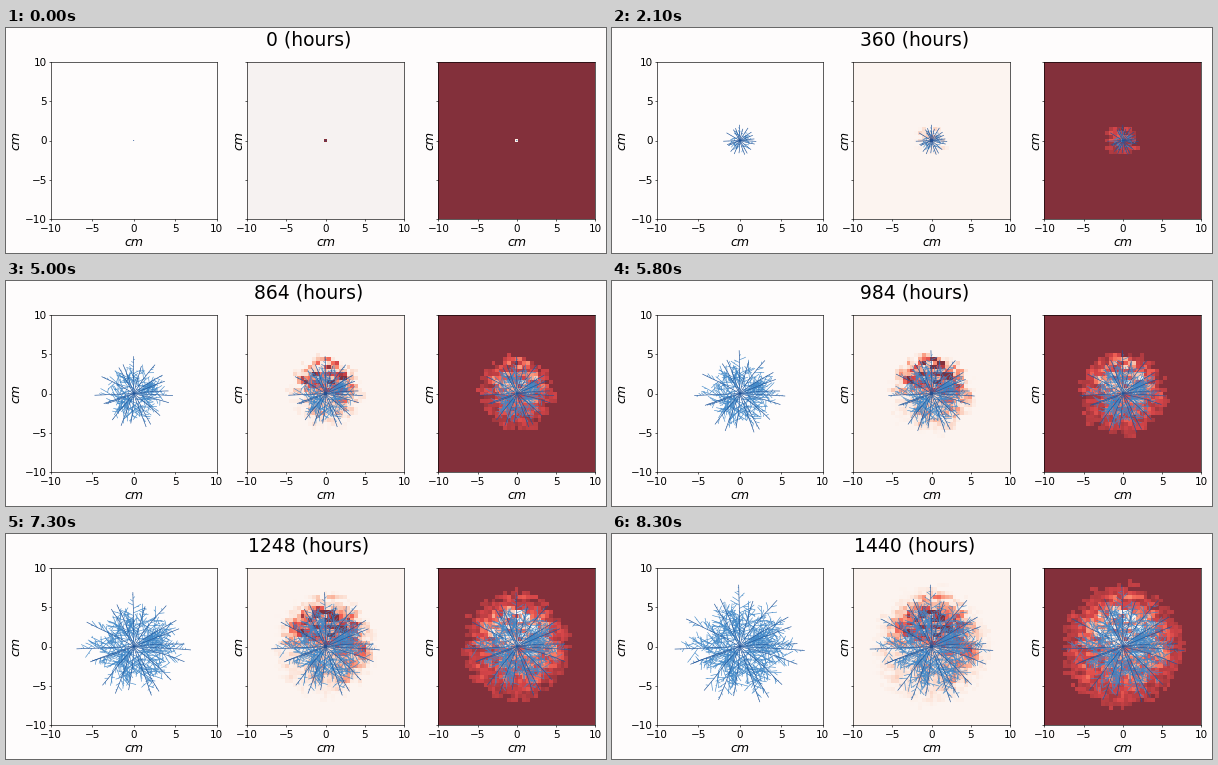
Animation of 600x225 px, one loop 8.4 s. Source, as a matplotlib script:

```python
import numpy as np
import matplotlib
import matplotlib.pyplot as plt
from matplotlib.animation import FuncAnimation
from matplotlib.collections import LineCollection

W, H, DPI = 600, 225, 100
FRAMES, STEP_MS, DAYS = 84, 100, 60
N = 41
BG = "#fefcfc"
DARK, LIGHT = "#1f5499", "#3f87c7"

plt.rcParams["font.family"] = "DejaVu Sans"
rng = np.random.default_rng(7)


class Root:
    """A gently bent line that lengthens at a fixed rate after its birth."""

    def __init__(self, start, angle, birth, rate, length, bend, seed=0.0, n=5):
        self.birth, self.rate, self.length = birth, rate, length
        self.seed, self.angle = seed, angle
        self.step = length / n
        heads = angle + np.cumsum(rng.normal(0, bend, n))
        moves = self.step * np.column_stack([np.cos(heads), np.sin(heads)])
        self.pts = np.vstack([start, start + np.cumsum(moves, axis=0)])

    def at(self, s):
        k = min(int(s / self.step), len(self.pts) - 2)
        f = s / self.step - k
        return k, self.pts[k] * (1 - f) + self.pts[k + 1] * f

    def grown(self, day):
        if day < self.birth:
            return None
        s = min(self.rate * (day - self.birth) + self.seed, self.length)
        k, tip = self.at(s)
        return np.vstack([self.pts[:k + 1], tip])


def branch(parent, s, delay, rate, length):
    _, p = parent.at(s)
    turn = rng.choice([-1, 1]) * np.radians(rng.uniform(22, 75))
    birth = parent.birth + s / parent.rate + delay
    return Root(p, parent.angle + turn, birth, rate, length, 0.06)


def build_roots():
    angles = [6, 21, 43, 58, 74, 91, 108, 123, 150, 183, 197, 211, 231, 249,
              268, 283, 302, 321, 343, 357]
    straight = (91, 183, 357)
    main = []
    for a in angles:
        v = 0.131 if a in straight else rng.uniform(0.1, 0.126)
        bend = 0.01 if a in straight else 0.05
        main.append(Root(np.zeros(2), np.radians(a), 0, v, 8.0, bend,
                         seed=0.01, n=8))
    side = [Root(np.array([-1.9, -0.05]), np.pi / 2, 19, 0.13, 2.6, 0.01)]
    for m in main:
        s = rng.uniform(0.4, 0.8)
        while s < m.rate * DAYS - 0.3:
            lat = branch(m, s, rng.uniform(1, 5), rng.uniform(0.06, 0.115),
                         rng.uniform(1.2, 4.0))
            side.append(lat)
            u = rng.uniform(0.3, 0.8)
            while u < lat.length:
                twig = branch(lat, u, rng.uniform(2, 5),
                              rng.uniform(0.04, 0.09), rng.uniform(0.5, 1.8))
                if twig.birth < DAYS:
                    side.append(twig)
                u += rng.uniform(0.5, 1.1)
            s += rng.uniform(0.3, 0.6)
    return main, side


main, side = build_roots()

# soil grid
c = (np.arange(N) + 0.5) * 20 / N - 10
X, Y = np.meshgrid(c, c)
dist = np.hypot(X, Y)
raw = rng.random((N, N))
noise = 0.65 * raw + 0.35 * np.roll(raw, 1, axis=1)
mid = N // 2


def blob(x, y, w, a):
    return a * np.exp(-((X - x) ** 2 + (Y - y) ** 2) / (2 * w * w))


hot = sum(blob(*b) for b in [
    (-1.8, 1.8, 1.1, .5), (.8, 2.4, 1.3, 1), (2.2, .6, 1.2, .6),
    (-.8, -2.8, .9, .45), (2.8, -2.2, 1, .3), (-3.8, 1.8, 1.1, .5),
    (3.5, 3, 1.2, .5), (.5, 4.8, 1.4, .6), (-2.5, 3.8, 1, .55),
    (4.6, -.6, 1, .45), (3.2, -4, 1, .25)])
reds = matplotlib.colormaps["Reds"]


def tint(v):
    return 0.8 * reds(np.clip(v, 0, 1))[..., :3] + 0.192


def soil(day):
    depth = np.clip(0.127 * day - dist + 1.8 * (noise - 0.5), 0, None)
    if day == 0:
        depth = np.zeros((N, N))
    uptake = (np.minimum(0.45 * depth, 1) * (0.75 * hot + 0.12)
              * (0.15 + 1.7 * noise) * min(1, 0.35 + day / DAYS))
    uptake[mid, mid] = 1
    loss = ((depth > 0) * 0.1 + 0.065 * depth) * (0.3 + 1.4 * noise)
    loss += 0.4 * hot * np.minimum(depth / 3, 1) * (0.4 + 1.2 * noise)
    left = 1 - loss
    left[mid, mid] = 0.04
    a, b = tint(uptake), tint(left)
    if day == 0:
        a[uptake == 0] = np.array([246, 242, 241]) / 255
    return a, b


fig = plt.figure(figsize=(W / DPI, H / DPI), dpi=DPI, facecolor=BG)


def label(x, y, text, size, **kw):
    return fig.text(x / W, 1 - y / H, text, fontsize=size, ha="center",
                    va="baseline", **kw)


def panel(x, w, names):
    ax = fig.add_axes([x / W, 34 / H, w / W, 157 / H], facecolor=BG)
    ax.set(xlim=(-10, 10), ylim=(-10, 10))
    ticks = range(-10, 11, 5)
    ax.set_xticks(ticks)
    ax.set_yticks(ticks)
    ax.tick_params(labelsize=7.5, length=1.5, width=0.45)
    ax.tick_params(axis="x", pad=2.2)
    ax.tick_params(axis="y", pad=1.3, labelleft=names)
    for sp in ax.spines.values():
        sp.set_linewidth(0.45)
    label(x + w / 2, 217.5, "cm", 9, style="italic")
    return ax


axes = [panel(45, 165.5, True), panel(241, 157, False),
        panel(432.4, 157, False)]
for x in (13.5, 236, 427.5):
    label(x, 113, "cm", 9, style="italic", rotation=90, rotation_mode="anchor")
title = label(302.5, 18, "", 13.5)

images = [ax.imshow(np.ones((N, N, 3)), extent=(-10, 10, -10, 10),
                    origin="lower", interpolation="nearest", aspect="auto",
                    zorder=0)
          for ax in axes[1:]]


def strands(ax, color, width, z):
    lc = LineCollection([], colors=color, linewidths=width, zorder=z)
    ax.add_collection(lc, autolim=False)
    return lc


side_lines = [strands(ax, LIGHT, 0.42, 1.5) for ax in axes]
main_lines = [strands(ax, DARK, 0.45, 1.6) for ax in axes]


def shapes(roots, day):
    return [p for p in (r.grown(day) for r in roots) if p is not None]


def update(i):
    day = DAYS * i / (FRAMES - 1)
    title.set_text(f"{24 * (DAYS * i // (FRAMES - 1))} (hours)")
    for im, data in zip(images, soil(day)):
        im.set_data(data)
    for group, roots in ((side_lines, side), (main_lines, main)):
        segs = shapes(roots, day)
        for lc in group:
            lc.set_segments(segs)
    return [title, *images, *side_lines, *main_lines]


anim = FuncAnimation(fig, update, frames=FRAMES, interval=STEP_MS,
                     repeat=True, repeat_delay=0, blit=False)
plt.show()
```
